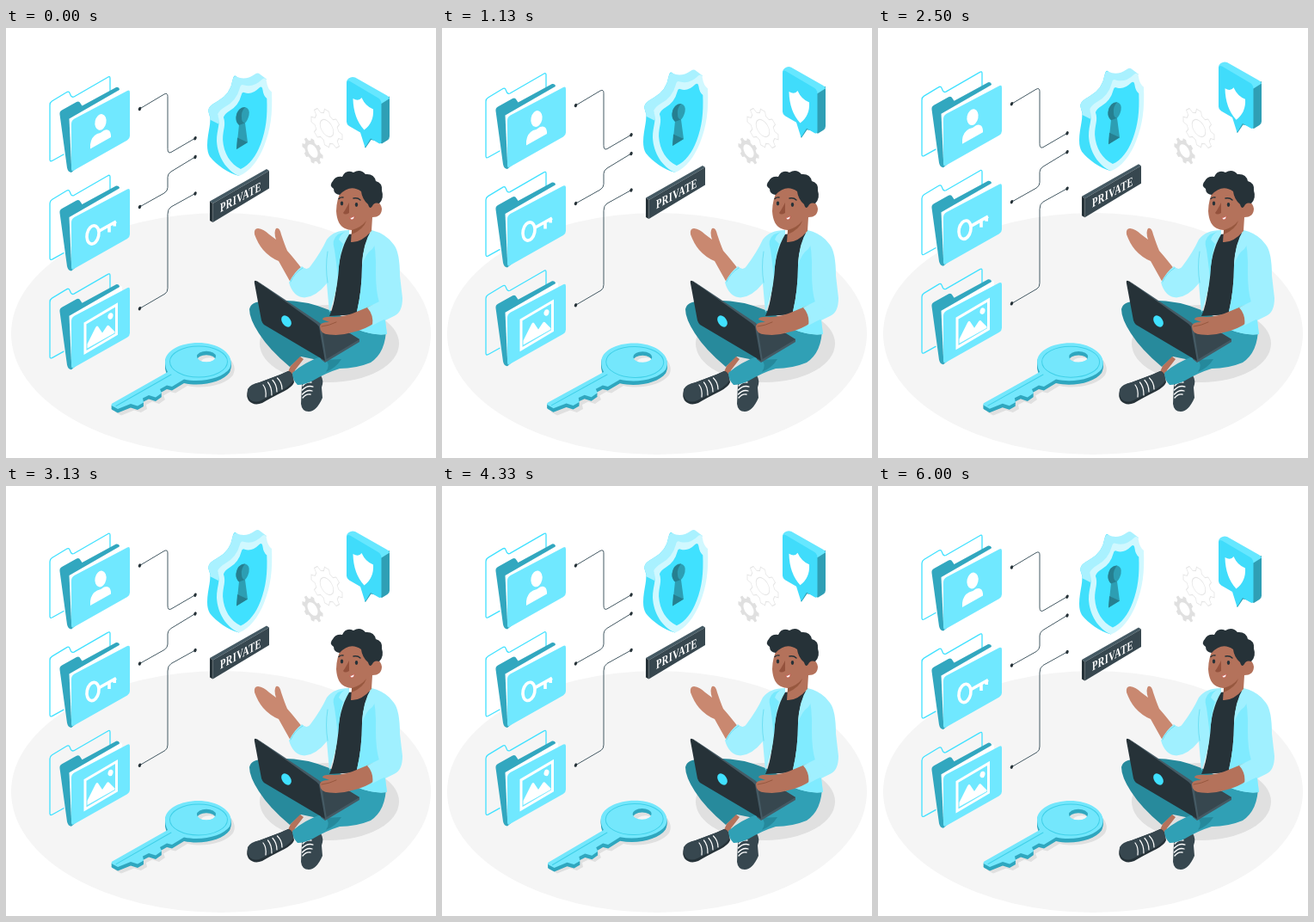
These frames come from a looping animation (500x500 px, 6040 ms). An HTML page:

```html
<!DOCTYPE html>
<html lang="en">
<head>
<meta charset="utf-8">
<style>
html, body { margin: 0; width: 100%; height: 100%; overflow: hidden; background: #fff; }
svg { display: block; width: 100%; height: 100%; }
.line { fill: none; stroke-linecap: round; stroke-linejoin: round; }
</style>
</head>
<body>
<svg viewBox="0 0 500 500">
<defs>
  <g id="folder">
    <path class="line" stroke="#40e1ff" stroke-width="1.300" d="M67 147.500L53.500 155Q51 156 51 153.500V90Q51 87 53.500 85.500L70 75.500Q73 73.500 74 76L75.500 79.500Q77 81.500 79 80.500L118 58Q121 56 121 59V75"/>
    <path fill="#32a7bf" d="M62.500 101Q62 97.500 65 96L82 86.500Q85 85 86.500 88L88.500 91L128 69.500Q131 69 132 71.500L110 140L76 168.500Q72 168 71 163Z"/>
    <path fill="#fff" d="M73.500 106L130 73.500L135 71V120L76 160Z"/>
    <path fill="#70e8ff" d="M76 112Q76 108 79.500 106L141 73.500Q144 72 144 75.500V126Q144 129 141 131L79 166Q76 168 76 164Z"/>
  </g>
  <path id="shield" d="M246 101Q248 96 255 92Q268 85 272 70Q273 65 277 67Q288 70 298 60Q302 57 303 63Q304 71 309 75C310 100 308 118 300 138C293 155 284 167 271 172.500C256 166 246 150 245 132C245 118 250 112 246 101Z"/>
  <path id="keyShape" fill-rule="evenodd" d="M188 400L123.500 436.500Q121.500 438 123.500 439.500L130 443L145 437L153 439.500L160 435.500L159 430.500L166 427L174 429.500L181 424.500L179 420L187 415.500L193 417L207 408.500C228 413 252 407 260 396C267 383 253 369 231 366.500C207 364 185 374 185 388Q185 395 188 400ZM222 382A11 6.300 0 1 0 244 382A11 6.300 0 1 0 222 382Z"/>
</defs>

<ellipse cx="250" cy="355.500" rx="244" ry="140.500" fill="#f5f5f5"/>
<ellipse cx="376" cy="367" rx="81" ry="45" fill="#e0e0e0"/>
<g id="gears"></g>

<g id="float">
  <use href="#folder"/><use href="#folder" y="114.600"/><use href="#folder" y="229.200"/>
  <g fill="#fff">
    <ellipse cx="110" cy="110" rx="6.500" ry="9.500" transform="rotate(12 110 110)"/>
    <path d="M98 141V136Q99 127 106 123.500Q110 123 114 119.500Q121 117 122 125V127.500Z"/>
  </g>
  <g class="line" stroke="#fff" stroke-width="3.600">
    <ellipse cx="101" cy="241" rx="6.800" ry="10.800" transform="rotate(12 101 241)"/>
    <path stroke-linecap="butt" d="M107.500 237L128 225.500M120 230V238M126.200 226.500V231"/>
    <path stroke-width="3" stroke-linejoin="miter" d="M92 344L128.500 322.500V356.500L92 378Z"/>
  </g>
  <g fill="#fff">
    <path d="M94.500 373V368L104 349Q106 345 108 349L112 355L117 347.500Q119 345 121 348L126.500 353.500V355Z"/>
    <ellipse cx="121.500" cy="335.500" rx="2.900" ry="3.800" transform="rotate(15 121.500 335.500)"/>
  </g>
  <path class="line" stroke="#455a64" d="M155.500 94.500L184 77.500Q188 75.500 188 80V141Q188 147 192 145L220 128.700M155.500 208.500L184 192.500Q188 190 188 186V174Q188 170 192 167.500L220 150.500M155.500 326.700L185 309.500Q188 307.500 188 303V217Q188 211 192 208.500L220 193"/>
  <g id="dots" fill="#263238"></g>

  <path fill="#40dffb" d="M236 100Q234 95 238 91Q240 89 247 85Q261 77 263.500 61Q265 54 268 57L290 80L271 172.500C258 169 245 160 237 150Q234 145 234 137C234 121 240 110 236 100Z"/>
  <path fill="#a9f1ff" d="M236 100Q234 95 238 91Q240 89 247 85Q261 77 263.500 61Q265 55 268 57Q278 62 289 54.500Q293 52 295 54L303 60L278 90L246 101Q249 106 247 112L237 107Q238 104 236 100Z"/>
  <use href="#shield" fill="#d0f8ff"/>
  <use href="#shield" fill="#40e1ff" transform="translate(278.500 117) scale(.8 .84) translate(-278 -116)"/>
  <path fill="#2d9eb3" d="M268 141.500L271 113Q266 109 268 101Q271 92 278 92.500Q284 94 282.500 102Q281 108 278 111L281 133.500Z"/>
  <path fill="#267f90" d="M268 141.500L269 128L281 133.500ZM267.500 104Q269 93 278 92.500Q273 98 274 105Q274 110 277.500 111L271 113.500Q267 110 267.500 104Z"/>

  <path fill="#455a64" d="M237 202L303 164.500L306 166.500L240.500 204.500Z"/>
  <path fill="#263238" d="M237 202L240.500 204.500V226.500L237 224.500Z"/>
  <path fill="#37474f" d="M240.500 204.500L306 166.500V187L240.500 226.500Z"/>
  <text transform="matrix(.7 -.38 0 1 249 215)" font-family="'Liberation Serif', serif" font-weight="700" font-size="15" letter-spacing=".6" fill="#fff">PRIVATE</text>
</g>

<g id="bubble">
  <g transform="translate(0 1.600)">
    <path fill="#2f9fb5" d="M436 85L446 79.500V126Q446 129 443.500 130.500L437 134.500L432 131.500L424.500 130L418 139.500L417 138.500L424 110Z"/>
    <path fill="#66e7ff" d="M396 63Q396 60 398.500 58.500Q402 56 406 57.500L443 78.500Q446 80 446 82L436.500 88L410 75Z"/>
    <path fill="#40dcfb" d="M396 64Q396 60 400 62L433 81.500Q436.500 84 436.500 88V132Q436.500 136 432.500 133.500L424 128.500L417.500 139L412 121.500L399 114Q396 112 396 109Z"/>
  </g>
</g>
<path id="badge" fill="#fff" d="M403.500 83Q410 87 413.500 82Q418 92 427 95.500Q428 111 416.500 119.500Q404 106 403.500 83Z"/>

<use href="#keyShape" x="4" y="7.500" fill="#e0e0e0"/>
<g id="key">
  <g fill="#2fa7bf">
    <use href="#keyShape" y="4.500"/><use href="#keyShape" y="3"/><use href="#keyShape" y="1.500"/>
  </g>
  <use href="#keyShape" fill="#74e7fc"/>
  <ellipse class="line" cx="224" cy="388" rx="33.500" ry="18" stroke="#40d0e8"/>
  <path class="line" stroke="#40d0e8" d="M192 403L128 439.500"/>
</g>

<g id="person">
  <path fill="#278a9c" d="M302 318Q285 317 283 327Q283 338 294 355Q306 374 330 394L343 382L372 388L400 340L376 328Q340 313 302 318Z"/>
  <path fill="#37474f" d="M344 415Q345 410 350 408L366 404Q370 410 367 418L368 430Q361 446 352 446Q344 446 343 437Z"/>
  <path class="line" stroke="#fff" stroke-width="1.300" d="M345 416Q349 411 355 412M344.500 421Q350 415 357 417M344.500 426Q350 420 356 422M345 430Q349 425 354 426"/>
  <path fill="#b4725b" d="M327 402L331 393L342 382L346 385L336 398L334 408Z"/>
  <path fill="#263238" d="M281 422Q284 415 295 412L319 403L328 399Q332 399 334 406L335 412Q333 417 324 422Q308 430 298 436Q288 440 282 433Q279 428 281 422Z"/>
  <path fill="#37474f" d="M281 420Q284 414 295 412L319 403L328 399Q332 399 334 406L334 410Q331 415 323 420Q308 427 297 433Q288 437 283 431Q280 426 281 420Z"/>
  <path class="line" stroke="#fff" stroke-width="1.200" d="M299 415Q303 420 302 429M304.500 412Q309 417 309 427M310 409.500Q315 415 315 423M315.500 407Q321 412 321 420"/>
  <path fill="#30a0b5" d="M442 348Q442 377 424 389Q407 396 388 396Q372 401 357 410Q347 415 339 415Q333 409 333 401Q346 389 371 380L410 345Z"/>
  <path fill="#25899c" d="M371 386L390 385Q384 395 372 400Q378 391 371 386Z"/>

  <path fill="#c98870" d="M331 296Q322 280 317 271Q307 267 299 258Q293 251 289 240Q288 233 293 233Q300 234 306 240L314 246Q311 237 314 233Q318 231 320 240Q324 252 327 259Q335 268 345 281Z"/>
  <path fill="#263238" d="M396 240Q386 255 385 290Q383 320 376 335L410 333L418 285L427 238Z"/>
  <path fill="#a0f0ff" d="M399 235Q381 235 373 246Q366 261 354 277Q350 283 344 277Q335 284 329 296Q334 313 347 313.500Q360 313 373 297L376 331Q384 310 386 290Q387 260 399 240Z"/>
  <path fill="#a0f0ff" d="M425 235Q442 239 451 252Q458 261 458 288L461 314Q461 331 451 335L441 340L443 356Q428 358 410 351L408 330Q414 304 414 276Q415 253 425 235Z"/>
  <path fill="#80ebff" d="M425 237Q431 258 430 285Q430 306 434 319L424 325L441 340L443 356Q428 358 410 351L408 330Q414 304 414 276Q415 253 425 237Z"/>
  <path fill="#a0f0ff" d="M425 235Q432 240 431 249L426 257Q418 262 414 276Q415 250 425 235Z"/>
  <path fill="#78e9fd" d="M399 235Q389 238 387 246L392 251Q388 261 386 290Q384 272 382 258Q378 246 386 240Z"/>
  <path class="line" stroke="#6ddff3" d="M374 260Q371 278 374 296M345 279Q335 285 331 295"/>

  <path fill="#b4725b" d="M391 186Q384 200 384 213Q385 229 394 233Q398 235 402 235L401 249Q413 250 425 236L426 220Q437 220 437 210Q435 200 427 204L424 186Z"/>
  <path fill="#97583f" d="M402 235Q413 232 419 224Q416 234 402 240Z"/>
  <path fill="#263238" d="M381 187Q375 183 380 178Q383 172 391 173Q395 164 404 168Q412 163 418 170Q428 169 430 178Q438 180 437 189Q440 198 434 204Q428 202 426 207Q423 212 421 205Q414 199 413 190Q400 181 388 194Q381 193 381 187Z"/>
  <ellipse cx="390.500" cy="204" rx="1.700" ry="2.400" fill="#263238"/>
  <ellipse cx="407.500" cy="205.500" rx="1.700" ry="2.400" fill="#263238"/>
  <path class="line" stroke="#263238" stroke-width="1.400" d="M387 198.500Q389 196.500 392 197M404 198Q409 197 412 200"/>
  <path fill="#94523d" d="M399 203Q395 211 392 215Q394 218 399 215Z"/>
  <path fill="#fff" stroke="#c4584f" stroke-width=".8" d="M399.500 220.500Q402 221 405 218.500Q405 223 401.500 223Z"/>

  <path fill="#455a64" d="M365 344L398 354L411 362V365L371 389L366 385Z"/>
  <path fill="#37474f" d="M365 344L398 354L411 362L371 386Z"/>
  <path fill="#455a64" d="M291 293.500L365 343Q367 345 367 348L373 387L370 387L362 350Z"/>
  <path fill="#263238" d="M289 297Q288 292 292 294.500L361 344Q364 346 364.500 350L371 387L300 345Q298 343 297 340Z"/>
  <ellipse cx="326" cy="341" rx="5" ry="7.300" fill="#40e1ff" transform="rotate(-35 326 341)"/>
  <path fill="#b4725b" d="M427 322L410 329Q395 336 382 336Q368 335 368 339L376 342Q365 342 365 347Q365 356 376 356.500Q390 358 402 354Q418 351 431 341Z"/>
  <path class="line" stroke="#97583f" d="M367 347Q376 346 384 342"/>
  <path fill="#a0f0ff" d="M420 325L436 317L452 334Q440 338 426 346Q428 334 420 325Z"/>
</g>
</svg>
<script>
const $ = id => document.getElementById(id);
const LOOP = 6040, BOB = LOOP / 4;

// Tilted gear: trapezoid teeth around a ring, with a round hole
function gear(x, y, r, hole, teeth, look) {
  let d = '';
  for (let i = 0; i < teeth; i++) {
    for (const [part, k] of [[-.32, .78], [-.18, 1], [.18, 1], [.32, .78]]) {
      const a = (i + part) / teeth * 2 * Math.PI;
      d += (d ? 'L' : 'M') + (r * k * Math.cos(a)).toFixed(2) + ' ' + (r * k * Math.sin(a)).toFixed(2);
    }
  }
  d += `ZM${hole} 0A${hole} ${hole} 0 1 0 ${-hole} 0A${hole} ${hole} 0 1 0 ${hole} 0Z`;
  return `<path d="${d}" fill-rule="evenodd" transform="matrix(.866 .5 0 1 ${x} ${y})" ${look}/>`;
}
$('gears').innerHTML =
  gear(373, 116.5, 21, 9, 8, 'fill="#fff" stroke="#e6e6e6"') +
  gear(356.5, 143, 14, 7, 8, 'fill="#e0e0e0"');

$('dots').innerHTML = [[155.5, 94.5], [220, 128.7], [155.5, 208.5], [220, 150.5], [155.5, 326.7], [220, 193]]
  .map(([x, y]) => `<ellipse cx="${x}" cy="${y}" rx="1.6" ry="2.3" transform="rotate(25 ${x} ${y})"/>`).join('');

// 0 at the ends of a cycle, 1 in the middle
const tri = p => 1 - Math.abs(2 * (p % 1) - 1);
const raise = (id, height) => $(id).setAttribute('transform', `translate(0 ${-height})`);

function draw(now) {
  const t = now % LOOP;
  const lift = tri((t + 40) / BOB);
  const tilt = 2 * tri(t / LOOP + .25) - 1;
  raise('float', 10 * lift);
  raise('bubble', 30 * lift);
  raise('badge', 20 * lift);
  $('key').setAttribute('transform', `rotate(${tilt} 192 407)`);
}

const start = performance.now();
function tick() {
  draw(performance.now() - start);
  requestAnimationFrame(tick);
}
tick();
</script>
</body>
</html>
```
